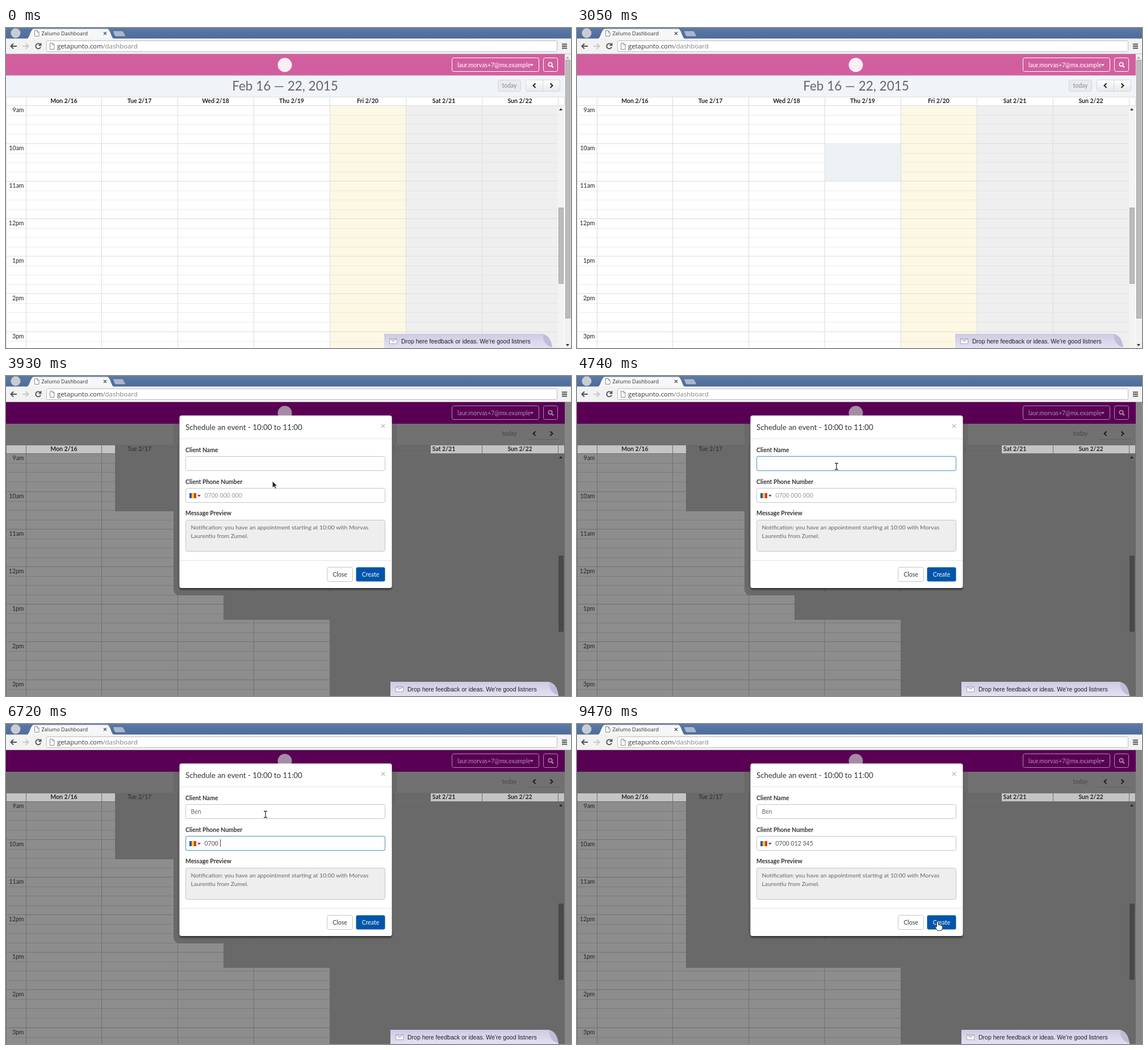
Recreate the animation shown at these times as an HTML page. Size 995x563 px, loop 9.79 s.

```html
<!DOCTYPE html>
<html lang="en">
<head>
<meta charset="utf-8">
<title>Schedule an event</title>
<style>
  html, body { margin: 0; width: 100%; height: 100%; overflow: hidden; }
  svg { display: block; width: 100%; height: 100%; font: 10.5px Lato, sans-serif; fill: #333; }
  text { white-space: pre; }
  .mid { text-anchor: middle; }
  .end { text-anchor: end; }
  .bold { font-weight: 700; }
  .ui { font-family: "Open Sans", sans-serif; }
  .note { font-family: "Liberation Sans", Arial, sans-serif; fill: #222; }
  .line { fill: none; stroke-width: 1; }
  .crisp { shape-rendering: crispEdges; }
  .field { fill: #fff; stroke: #c4c4c4; }
  .focus { fill: none; stroke: #5b9dba; filter: drop-shadow(0 0 2px rgba(90, 160, 195, .45)); }
  .muted { fill: #666; }
</style>
</head>
<body>
<svg viewBox="0 0 995 563" xmlns="http://www.w3.org/2000/svg">
  <defs>
    <linearGradient id="strip" x2="0" y2="1"><stop stop-color="#5b7aa8"/><stop offset="1" stop-color="#4c6b99"/></linearGradient>
    <linearGradient id="button" x2="0" y2="1"><stop stop-color="#fff"/><stop offset="1" stop-color="#e6e8ea"/></linearGradient>
    <linearGradient id="lilac" x2="0" y2="1"><stop stop-color="#cfcae3"/><stop offset="1" stop-color="#e4e1f2"/></linearGradient>
    <filter id="shadow" x="-10%" y="-10%" width="120%" height="125%"><feDropShadow dx="0" dy="3" stdDeviation="1.500" flood-color="#000" flood-opacity=".5"/></filter>
    <path id="chevrons" d="M932.500 97.500l-4 3.800 4 3.800M958.500 97.500l4 3.800-4 3.800" fill="none" stroke-width="2"/>
    <path id="beamShape" d="M-3 -5.500H-1L0 -4.500L1 -5.500H3M0 -4.500V4.500M-3 5.500H-1L0 4.500L1 5.500H3"/>
  </defs>

  <!-- browser frame -->
  <rect width="995" height="19" fill="url(#strip)"/>
  <circle cx="17" cy="9" r="8.500" fill="#c9ccd1"/>
  <path d="M37 19C42 17 43 2 49 1.500H178C184 2 185 17 190 19Z" fill="#f6f7f8"/>
  <path d="M188 5h16q2 0 3 2l4 8h-17q-2 0-3-2z" fill="#a9b7cd" stroke="#48638c" stroke-width=".7"/>
  <path d="M50.500 4.500h4.500l3 3v7h-7.500zM55 4.500v3h3" fill="#fff" stroke="#888"/>
  <text class="ui" x="62.500" y="13" font-size="9.150">Zelumo Dashboard</text>
  <path d="M172 7l5 5M177 7l-5 5" stroke="#555" stroke-width="1.400"/>
  <rect y="18.500" width="995" height="27" fill="#f2f2f2"/>
  <rect x="71.500" y="22.500" width="899" height="19" rx="2" fill="#fff" stroke="#bbb"/>
  <g class="line" stroke="#505050" stroke-width="2">
    <path d="M19 32H9M13 27.500L8.500 32l4.500 4.500" stroke-width="2"/>
    <path d="M29 32H39M35 27.500l4.500 4.500-4.500 4.500" stroke="#c9c9c9" stroke-width="2"/>
    <path d="M60.300 29A4.500 4.500 0 1 0 61 33.500M61.500 26.500v4h-4" stroke-width="1.900"/>
    <path d="M979 28.500h9M979 32h9M979 35.500h9" stroke-width="2"/>
    <path d="M77.500 26.500h4.500l3 3v8h-7.500zM82 26.500v3h3" stroke="#888" stroke-width="1"/>
  </g>
  <text class="ui" x="90" y="36" font-size="11.350">getapunto.com<tspan fill="#808080">/dashboard</tspan></text>
  <path class="line" d="M0 45.500H995" stroke="#c4bcc2"/>

  <!-- calendar page -->
  <g id="page">
    <rect y="46" width="984" height="38" fill="#d15f9f"/>
    <circle cx="491" cy="65" r="12.500" fill="#fbeef5"/>
    <g id="account"></g>
    <rect y="83.500" width="984" height="38" fill="#f0f4f8"/>
    <text class="mid" x="491.500" y="110" font-size="22.500" fill="#666">Feb 16 — 22, 2015</text>
    <rect x="866.500" y="91.500" width="40" height="20" rx="3" fill="#e8ebee" stroke="#d3d7da"/>
    <text class="mid" x="886.500" y="105" fill="#888">today</text>
    <rect x="915.500" y="91.500" width="60" height="20" rx="3" fill="url(#button)" stroke="#d3d7da"/>
    <path class="line" d="M945.500 92v19" stroke="#d3d7da"/>
    <use href="#chevrons" stroke="#222"/>
    <rect y="121" width="984" height="442" fill="#fff"/>
    <rect x="571" y="137" width="133" height="426" fill="#fdf8e4"/>
    <rect x="704" y="137" width="268" height="426" fill="#efefef"/>
    <g id="grid"></g>
    <rect id="selection" x="437" y="203.500" width="133" fill="#ecf1f4"/>
    <rect x="972" y="137" width="11" height="426" fill="#f3f3f3"/>
    <path d="M974 145h6l-3-4z"/>
    <rect x="973.500" y="316.500" width="8" height="133" fill="#bcbcbc" stroke="#a6a6a6"/>
    <rect x="984" y="46" width="11" height="517" fill="#f1f1f1"/>
    <path d="M986 54h6l-3-4z" fill="#aaa"/>
    <rect x="985.500" y="56.500" width="8" height="454" fill="#bcbcbc" stroke="#a6a6a6"/>
    <path d="M986 556h6l-3 4z"/>
  </g>

  <!-- dimmed page -->
  <g id="dimmed">
    <rect y="46" width="984" height="38" fill="#590054"/>
    <circle cx="491" cy="65" r="12.500" fill="#a58ba5"/>
    <g id="accountDim"></g>
    <rect y="84" width="984" height="479" fill="#696969"/>
    <rect y="84" width="984" height="37" fill="#717171"/>
    <rect x="984" y="46" width="11" height="517" fill="#858585"/>
    <text class="mid" x="886.500" y="105" fill="#464646">today</text>
    <path class="line" d="M918 111.500H975" stroke="#606060"/>
    <use href="#chevrons" stroke="#1c1c1c"/>
    <rect y="121" width="983" height="15" fill="#c4c4c4"/>
    <rect y="136" width="570" height="427" fill="#8d8d8d"/>
    <g id="gridDim"></g>
    <path d="M295 84H689V386H307Q295 386 295 374Z" fill="#696969"/>
    <g id="patches" fill="#696969">
      <path d="M192 121H296V238H192ZM383 386H571V429H383ZM683 121H748V136H683Z"/>
      <path id="latePatch" d="M192 237H307V386H384V429H192Z"/>
      <text class="mid" x="235" y="132" fill="#2b2b2b">Tue 2/17</text>
    </g>
    <path class="line" d="M302.500 122V370M683.500 122v14M436.500 374v6M570.500 374v6" stroke="#585858"/>
    <path d="M974 145h6l-3-4z" fill="#222"/>
    <rect x="973" y="316" width="9" height="134" fill="#484848"/>
  </g>

  <g id="feedback">
    <path d="M666 538H944Q958 540 962 563H666Z" fill="url(#lilac)"/>
    <path d="M946 538.500Q959 541 962 562Q944 556 946 538.500Z" fill="#c0bbd7"/>
    <path d="M675.500 546.500h13v9h-13zl6.500 5 6.500-5" fill="#f8f8fc" stroke="#aaa8b8"/>
    <text class="note" x="696" y="554.500">Drop here feedback or ideas. We're good listners</text>
  </g>

  <!-- dialog -->
  <g id="dialog">
    <rect x="305.500" y="69.500" width="374" height="303.500" rx="4" fill="#fff" filter="url(#shadow)"/>
    <path class="line" d="M306 110.500H679M306 324.500H679" stroke="#e3e3e3"/>
    <text x="316" y="94.500" font-size="13.300">Schedule an event - 10:00 to 11:00</text>
    <text class="mid bold" x="664" y="92.500" font-size="15.750" fill="#bdbdbd">×</text>
    <g class="bold" font-size="10.450">
      <text x="316" y="133.700">Client Name</text>
      <text x="316" y="189.500">Client Phone Number</text>
      <text x="316" y="245.200">Message Preview</text>
    </g>
    <rect class="field" x="316.500" y="141.500" width="351" height="25" rx="3"/>
    <rect class="field" x="316.500" y="197.500" width="351" height="25" rx="3"/>
    <rect class="field" x="316.500" y="253.500" width="351" height="55" rx="3" style="fill:#eee"/>
    <rect id="nameFocus" class="focus" x="316.500" y="141.500" width="351" height="25" rx="3"/>
    <rect id="phoneFocus" class="focus" x="316.500" y="197.500" width="351" height="25" rx="3"/>
    <text id="name" class="muted" x="325.500" y="158"></text>
    <g id="country">
      <path d="M323 206h4v9h-4z" fill="#3355b5"/><path d="M327 206h4v9h-4z" fill="#f7d117"/><path d="M331 206h4v9h-4z" fill="#d8323c"/>
      <path d="M337 209h6l-3 3.500z" fill="#555"/>
      <text id="phone" class="muted" x="349.500" y="213.700"></text>
    </g>
    <rect id="caret" width="1" height="13" fill="#444"/>
    <g class="muted" font-size="10.420">
      <text x="325.500" y="269.500">Notification: you have an appointment starting at 10:00 with Morvas</text>
      <text x="325.500" y="284.500">Laurentiu from Zumel.</text>
    </g>
    <rect class="field" x="565.500" y="336.500" width="45" height="25" rx="3"/>
    <text class="mid" x="588" y="353">Close</text>
    <rect x="616.500" y="336.500" width="51" height="25" rx="3" fill="#0055aa"/>
    <text class="mid" x="642" y="353" fill="#fff">Create</text>
  </g>

  <g id="pointer">
    <g id="beam" class="line">
      <use href="#beamShape" stroke="#fff" stroke-width="2.500" opacity=".5"/>
      <use href="#beamShape" stroke="#333" stroke-width="1.300"/>
    </g>
    <path id="arrow" d="M0 0V12L3 9.500L5 14L7 13L5 8.800H8.500Z" fill="#222" stroke="#fff" stroke-width=".8"/>
    <path id="hand" d="M-1 0Q1 -1.500 2 .5V5Q4 4 5 5.500Q7 5 7.500 6.500Q9 6.500 9 8V11L7.500 15H0L-3.500 9.500Q-4 7.500-1 8.500Z" fill="#fff" stroke="#333"/>
  </g>
</svg>
<script>
const LOOP = 9790;
const $ = id => document.getElementById(id);
const show = (id, visible) => { $(id).style.display = visible ? "" : "none"; };
const clamp = v => Math.max(0, Math.min(1, v));
const ramp = (t, from, to) => clamp((t - from) / (to - from));

const days = ["Mon 2/16", "Tue 2/17", "Wed 2/18", "Thu 2/19", "Fri 2/20", "Sat 2/21", "Sun 2/22"];
const hours = ["9am", "10am", "11am", "12pm", "1pm", "2pm", "3pm"];
const columnX = i => Math.floor(35 + 133.9 * i) + .5;
const rowY = i => Math.floor(136.8 + 66.2 * i) + .5;

function grid({ right, columns, major, minor, dash, ink }) {
  let solid = "M0 121.5H984M0 136.5H984M.5 121V563M972.5 121V136M983.5 121V136", dotted = "", labels = "";
  days.forEach((day, i) => {
    solid += `M${columnX(i)} 121V${i < columns ? 563 : 136}`;
    labels += `<text class="mid bold" x="${columnX(i) + 66.5}" y="132">${day}</text>`;
  });
  hours.forEach((hour, i) => {
    solid += `M0 ${rowY(i)}H${right}`;
    for (let k = 1; k < 4; k++) dotted += `M0 ${Math.floor(rowY(i) + 16.55 * k) + .5}H${right}`;
    labels += `<text class="end" x="31.5" y="${rowY(i) + 11.7}">${hour}</text>`;
  });
  return `<path class="line crisp" d="${dotted}" stroke="${minor}" stroke-dasharray="${dash}"/>
    <path class="line crisp" d="${solid}" stroke="${major}"/><g fill="${ink}">${labels}</g>`;
}

const account = color => `
  <g class="line" stroke="${color}">
    <rect x="785.5" y="52.5" width="153" height="24" rx="3"/>
    <rect x="946.5" y="52.5" width="25" height="24" rx="3"/>
    <circle cx="958.5" cy="64" r="3.2" stroke-width="1.6"/>
    <path d="M961 66.500l3 3" stroke-width="2"/>
  </g>
  <g fill="${color}"><text x="795" y="68.500">laur.morvas+7@mx.example</text><path d="M923 63.500h6l-3 3.500z"/></g>`;

$("grid").innerHTML = grid({ right: 972, columns: 7, major: "#dcdcdc", minor: "#d9d9d9", dash: "1 1", ink: "#222" });
$("gridDim").innerHTML = grid({ right: 570, columns: 4, major: "#707070", minor: "#7b7b7b", dash: "none", ink: "#262626" });
$("account").innerHTML = account("#fff");
$("accountDim").innerHTML = account("#ac8fac");

// Each entry: time, number of characters typed so far.
const nameKeys = [[4850, 1], [5060, 2], [5220, 3]];
const phoneKeys = [[6050, 1], [6350, 2], [6590, 3], [6720, 5], [6880, 6], [6930, 7], [7090, 9], [7680, 10], [7960, 11], [8110, 12]];
const typed = (text, keys, t) => text.slice(0, keys.filter(([at]) => at <= t).reduce((n, key) => key[1], 0));

// Each entry: time, x, y.
const route = [[3600, 500, 250], [4020, 457, 159], [8689, 457, 159], [8690, 470, 146],
  [8820, 500, 116], [8950, 543, 140], [9250, 629, 328], [9340, 634.5, 348.500]];

function pointerAt(t) {
  const next = route.findIndex(([at]) => at > t);
  if (next < 0) return route[route.length - 1].slice(1);
  const [t0, x0, y0] = route[next - 1], [t1, x1, y1] = route[next];
  const k = ramp(t, t0, t1);
  return [x0 + (x1 - x0) * k, y0 + (y1 - y0) * k];
}

function movePointer(t) {
  show("pointer", t >= 3600);
  if (t < 3600) return;
  const start = t < 8690 ? 3600 : 8690;
  const [x, y] = pointerAt(start + Math.floor((t - start) / 43) * 43);
  const inField = x > 316 && x < 668 && ((y > 141 && y < 167) || (y > 197 && y < 223));
  const onButton = x > 616 && y > 336;
  $("pointer").setAttribute("transform", `translate(${x} ${y})`);
  show("beam", inField);
  show("hand", onButton);
  show("arrow", !inField && !onButton);
}

function render(t) {
  const open = t >= 3410;
  const slots = t < 2630 ? 0 : t < 2810 ? 1 : t < 2930 ? 2 : t < 3050 ? 3 : 4;
  show("page", !open);
  show("dimmed", open);
  show("dialog", open);
  $("selection").setAttribute("height", slots * 16.4);
  $("feedback").setAttribute("transform", `translate(${open ? 11 : 0} 0)`);
  show("patches", t >= 3680);
  show("latePatch", t >= 9000);
  show("country", t >= 3580);

  const name = typed("Ben", nameKeys, t);
  const phone = typed("0700 012 345", phoneKeys, t);
  $("name").textContent = name;
  $("phone").textContent = phone || "0700 000 000";
  $("phone").style.fill = phone ? "#555" : "#999";
  $("nameFocus").style.opacity = ramp(t, 4030, 4170) - ramp(t, 5450, 5610);
  $("phoneFocus").style.opacity = ramp(t, 5450, 5610) - ramp(t, 9330, 9470);

  const onPhone = t >= 5490;
  const active = onPhone ? phone && t < 9330 : name;
  show("caret", active);
  if (active) {
    const field = $(onPhone ? "phone" : "name");
    const left = (onPhone ? 349.5 : 325.5) + field.getComputedTextLength();
    $("caret").setAttribute("x", Math.round(left));
    $("caret").setAttribute("y", onPhone ? 203 : 148);
  }
  movePointer(t);
}

function tick() {
  render(performance.now() % LOOP);
  requestAnimationFrame(tick);
}
tick();
</script>
</body>
</html>
```
